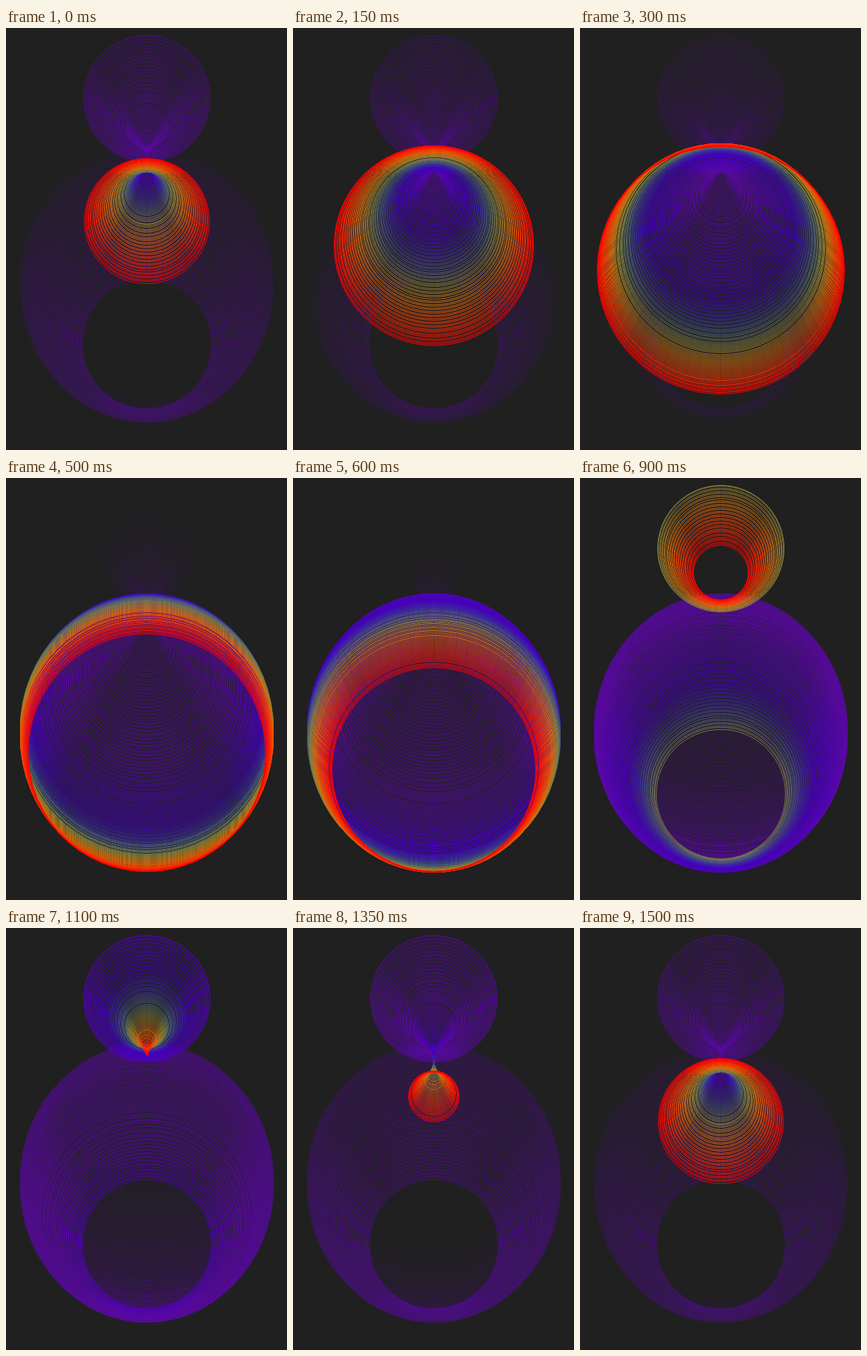
An HTML page with a canvas that plays this animation: 400x600 px, repeating every 1550 ms.

```html
<!DOCTYPE html>
<html lang="en">
<head>
<meta charset="utf-8">
<title>Glowing rings</title>
<style>
  html, body { margin: 0; width: 100%; height: 100%; overflow: hidden; background: #202020; }
  canvas { display: block; }
</style>
</head>
<body>
<canvas id="stage" width="400" height="600"></canvas>
<script>
const ctx = document.getElementById('stage').getContext('2d');
const BACKGROUND = [32, 32, 32];
const RINGS = 360, STEP_MS = 50, STEPS = 30;

// Colour of a ring by its distance behind the leading one
const STOPS = [
  [0, [255, 0, 0]],
  [12, [255, 50, 0]],
  [24, [215, 110, 10]],
  [35, [130, 130, 60]],
  [43, [75, 95, 120]],
  [52, [60, 40, 165]],
  [62, [68, 0, 190]],
  [105, [90, 8, 165]],
  [290, BACKGROUND],
  [RINGS, BACKGROUND]
];

function colourAt(lag) {
  const next = STOPS.findIndex(([at]) => at > lag);
  const [a, from] = STOPS[next - 1], [b, to] = STOPS[next];
  const k = (lag - a) / (b - a);
  return `rgb(${from.map((v, i) => Math.round(v + (to[i] - v) * k)).join()})`;
}

const colours = Array.from({ length: RINGS }, (_, lag) => colourAt(lag));

// The centre travels evenly downwards while the radius swings as a sine
const rings = Array.from({ length: RINGS }, (_, i) => {
  const degrees = i - 180;
  return {
    y: Math.floor(275 + degrees * 175 / 180),
    r: Math.ceil(90 * (1 + Math.sin(degrees * Math.PI / 180)))
  };
});

function draw(step) {
  ctx.setTransform(1, 0, 0, 1, 0, 0);
  ctx.fillStyle = `rgb(${BACKGROUND.join()})`;
  ctx.fillRect(0, 0, 400, 600);
  ctx.translate(0.5, 0.5);
  const head = 179 + step * RINGS / STEPS;
  for (let lag = RINGS - 1; lag >= 0; lag--) {
    const { y, r } = rings[(head - lag + RINGS) % RINGS];
    ctx.strokeStyle = colours[lag];
    ctx.beginPath();
    ctx.arc(200, y, r, 0, 2 * Math.PI);
    ctx.stroke();
  }
}

let shown = -1;
function tick() {
  // The closing step repeats the opening pose
  const step = Math.floor(performance.now() / STEP_MS) % (STEPS + 1) % STEPS;
  if (step !== shown) draw(shown = step);
  requestAnimationFrame(tick);
}
tick();
</script>
</body>
</html>
```
